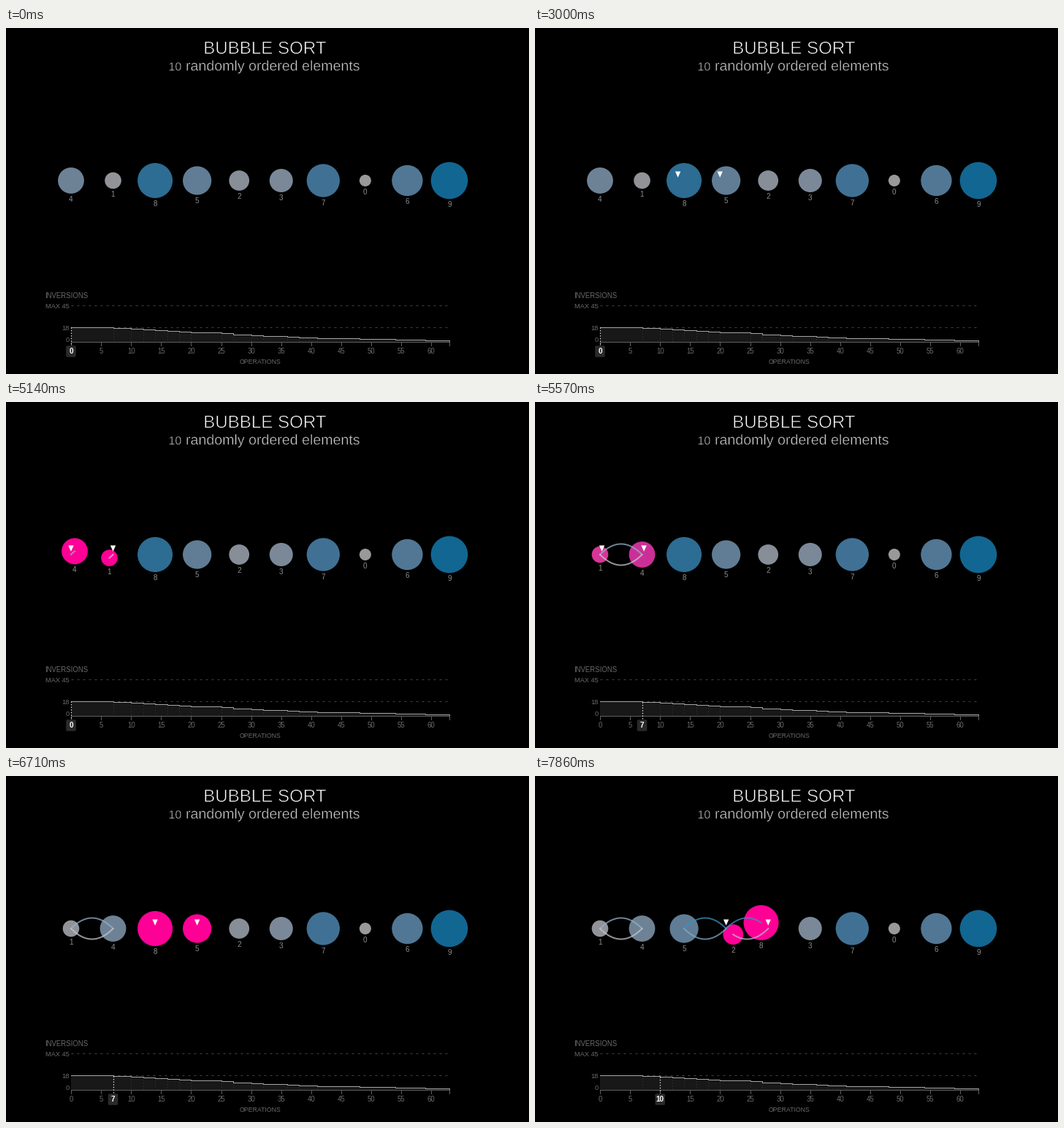
Write a matplotlib script that moves like this. It is 716 by 474 pixels and loops after 8 s.

```python
import numpy as np
import matplotlib.pyplot as plt
from matplotlib.animation import FuncAnimation
from matplotlib.patches import Circle, FancyBboxPatch, Polygon
from matplotlib.patheffects import Stroke

W, H, DPI = 716, 474, 100
PX = 72 / DPI
LOOP, INTERVAL = 8000, 40
RATE = 7                      # the stage refreshes seven times a second
START = [4, 1, 8, 5, 2, 3, 7, 0, 6, 9]
X0, GAP, CY = 89, 57.55, 209
OPS, WARMUP = 63, 5
PINK = np.array([255, 0, 151]) / 255

OP7, BEAT = 4969, 513         # start of operation 7, time per operation
MOVE, LAG, FADE = 400, 62, 250


def gray(v):
    return (v / 255,) * 3


def slot(i):
    return X0 + GAP * i


def op_x(op):
    return X0 + op * 518 / OPS


def inv_y(n):
    return 429.5 - n * 50 / 45


def radius(v):
    return 8 * np.sqrt(1 + v)


def shade(v):
    u = v / 9
    red = 18 + 135 * (1 - u ** 1.2) ** 0.8
    return np.array([red, 153 - 51 * u, 153 - 7 * u]) / 255


def ease(t):
    t = min(max(t, 0), 1)
    return 4 * t ** 3 if t < 0.5 else 1 - 4 * (1 - t) ** 3


def bubble_sort(items):
    """Return the operations as (number, index, swapped)."""
    a, op, log = list(items), WARMUP, []
    for end in range(len(a) - 1, 0, -1):
        for i in range(end):
            op += 1
            log.append((op, i, False))
            if a[i] > a[i + 1]:
                a[i], a[i + 1] = a[i + 1], a[i]
                op += 1
                log.append((op, i, True))
    return [e for e in log if e[0] <= OPS]


def op_time(op):
    return OP7 + (op - 7) * BEAT


LOG = bubble_sort(START)
SWAPS = [(op, i) for op, i, swapped in LOG if swapped]
ACTIVE = [s for s in SWAPS if op_time(s[0]) < LOOP]

# pointer moves: start, duration, from slot, to slot
MOVES = [(2130, 688, -0.44, 2), (2818, 690, 2, 0), (3508, 335, 0, 1),
         (3843, 690, 1, 0)]
last = 0
for op, i, swapped in LOG:
    if op > 7 and not swapped and op_time(op) < LOOP:
        MOVES.append((op_time(op), MOVE, last, i))
        last = i

fig = plt.figure(figsize=(W / DPI, H / DPI), dpi=DPI, facecolor="black")
ax = fig.add_axes([0, 0, 1, 1])
ax.set_xlim(0, W)
ax.set_ylim(H, 0)
ax.axis("off")


def label(x, y, s, size, color, ha="center", **kw):
    return ax.text(x, y, s, fontsize=size * PX, color=color, ha=ha,
                   va="baseline", family="Liberation Sans", **kw)


def light(x, y, s, size, color, trim, ha="center"):
    """Text made thinner by a black outline."""
    outline = Stroke(linewidth=trim * PX, foreground="black")
    label(x, y, s, size, color, ha, path_effects=[outline])


def line(xs, ys, color, width=1, **kw):
    return ax.plot(xs, ys, color=color, lw=width * PX, **kw)[0]


# headings
light(354.5, 35.3, "BUBBLE SORT", 24.1, "white", 0.7)
light(222.5, 58.3, "10", 16, gray(205), 0.4, "left")
light(246, 58.3, "randomly ordered elements", 19.6, gray(205), 0.4, "left")

# inversions chart
DIM = gray(106)
label(53.5, 370.5, "INVERSIONS", 9.7, DIM, "left")
label(53.5, 384.5, "MAX 45", 9.3, DIM, "left")
label(87, 414.5, "18", 9.3, DIM, "right")
label(87, 430.5, "0", 9.3, DIM, "right")
label(348, 460.5, "OPERATIONS", 8.8, DIM)

level = len(SWAPS)
steps_x, steps_y = [op_x(0)], [inv_y(level)]
for op, _ in SWAPS:
    steps_x += [op_x(op)] * 2
    steps_y += [inv_y(level), inv_y(level - 1)]
    level -= 1
ax.fill_between(steps_x, steps_y, 429.5, color=gray(24), lw=0)
for k, (op, _) in enumerate(SWAPS):
    line([op_x(op)] * 2, [inv_y(len(SWAPS) - k), 429], gray(58),
         ls=(0, (1, 3)))
for y in (379.5, 409.5):
    line([X0, op_x(OPS)], [y, y], gray(66), ls=(0, (3, 5)))
line([X0, op_x(OPS)], [429.5, 429.5], gray(95))
line(steps_x, steps_y, gray(165))
for op in list(range(0, OPS, 5)) + [OPS]:
    line([op_x(op)] * 2, [429.5, 434.5], gray(95), snap=True)
tick_text = {op: label(op_x(op), 446.5, str(op), 9.6, DIM)
             for op in range(0, OPS, 5)}

# current operation on the axis
cursor = line([X0, X0], [409, 434], "white", 1.2, ls=(0, (1, 2)))
badge = FancyBboxPatch((0, 437), 10, 12, boxstyle="round,pad=1.8",
                       fc=gray(42), ec="none", zorder=3)
ax.add_patch(badge)
badge_text = label(X0, 446.5, "0", 10, "white", weight="bold", zorder=4)

# balls, swap trails and pointers
balls, digits = {}, {}
for i, v in enumerate(START):
    balls[v] = ax.add_patch(Circle((slot(i), CY), radius(v), ec="none",
                                   zorder=5))
    digits[v] = label(slot(i), CY + radius(v) + 11, str(v), 10, gray(140),
                      zorder=6)
trails = [[line([], [], "white", 2, alpha=0.75, zorder=7) for _ in range(2)]
          for _ in ACTIVE]
pointers = [ax.add_patch(Polygon([(0, 0), (1, 0), (0, 1)], fc="white",
                                 ec="none", zorder=8)) for _ in range(2)]


def arc(i, p, side):
    """Point on a swap path; side 1 goes right above, -1 left below."""
    x = slot(i) + GAP * p if side > 0 else slot(i + 1) - GAP * p
    return x, CY - side * 58 * p * (1 - p)


def pointer_x(t):
    x = None
    for start, span, a, b in MOVES:
        if t >= start:
            x = slot(a + (b - a) * ease((t - start) / span))
    return x


def draw(frame):
    k = int((frame * INTERVAL + 30) * RATE / 1000)
    t = k * 1000 / RATE

    order = list(START)
    spot = {v: (slot(i), CY) for i, v in enumerate(order)}
    glow = dict.fromkeys(order, 0)
    current, done = 0, 0
    for (op, i), pair in zip(ACTIVE, trails):
        begin = op_time(op)
        p = ease((t - begin - LAG) / MOVE)
        for curve in pair:
            curve.set_data([], [])
        if t < begin:
            continue
        movers = order[i], order[i + 1]
        path = np.linspace(0, p, 30)
        for v, side, curve in zip(movers, (1, -1), pair):
            spot[v] = arc(i, p, side)
            glow[v] = min(1, max(0, 1 - (t - begin - BEAT) / FADE))
            curve.set_data(*arc(i, path, side))
            curve.set_color(np.minimum(shade(v) * 1.35, 1))
        order[i], order[i + 1] = order[i + 1], order[i]
        if p >= 1:
            current, done = op, done + 1

    for v, ball in balls.items():
        x, y = spot[v]
        ball.center = x, y
        ball.set_facecolor(shade(v) + (PINK - shade(v)) * glow[v])
        digits[v].set_position((x, y + radius(v) + 11))

    x = pointer_x(t)
    for j, tri in enumerate(pointers):
        tri.set_visible(x is not None)
        if x is not None:
            c = x + j * GAP
            tri.set_xy([(c - 3.7, 196.5), (c + 3.7, 196.5), (c, 204.8)])

    cx = op_x(current)
    cursor.set_data([cx, cx], [inv_y(len(SWAPS) - done), 434])
    badge.set_x(cx - 5)
    badge_text.set_x(cx)
    badge_text.set_text(str(current))
    for op, text in tick_text.items():
        text.set_visible(op != current)
    return []


anim = FuncAnimation(fig, draw, frames=LOOP // INTERVAL, interval=INTERVAL,
                     init_func=lambda: draw(0), repeat=True, repeat_delay=0,
                     blit=False)
plt.show()
```
